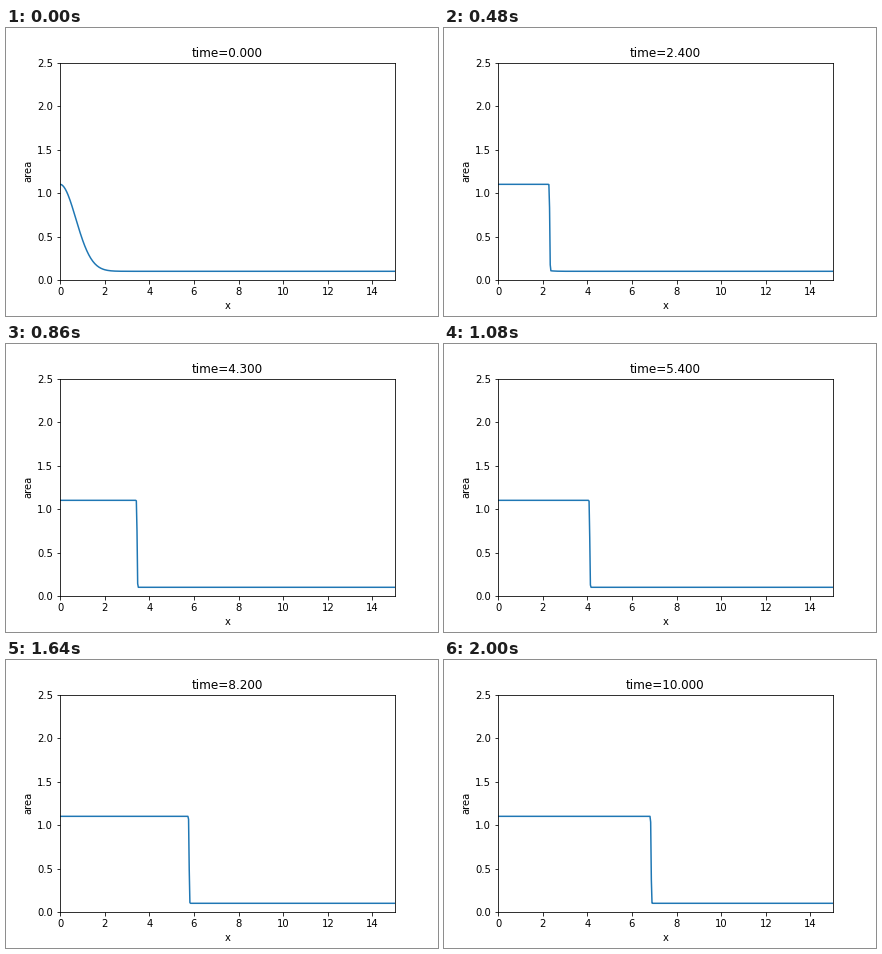
Animation of 432x288 px, one loop 2.02 s. Source, as a matplotlib script:

```python
import numpy as np
import matplotlib.pyplot as plt
from matplotlib.animation import FuncAnimation

LENGTH, CELLS = 15.0, 501
FRAMES, STEP = 101, 0.1
SUBSTEPS = 5
K, M = 0.472, 2.5


def flux(a):
    return K * a**M


def solve(x):
    """Upwind solution of a_t + flux(a)_x = 0, one row per output time."""
    a = 0.1 + np.exp(-x**2)
    ratio = STEP / SUBSTEPS / (x[1] - x[0])
    rows = [a.copy()]
    for _ in range(FRAMES - 1):
        for _ in range(SUBSTEPS):
            a[1:] -= ratio * np.diff(flux(a))
        rows.append(a.copy())
    return rows


x = np.linspace(0, LENGTH, CELLS)
areas = solve(x)

fig, ax = plt.subplots(figsize=(6, 4), dpi=72)
fig.subplots_adjust(left=0.125, right=0.9, bottom=0.125, top=0.88)
line, = ax.plot(x, areas[0], color="#1f77b4", lw=1.5)
ax.set(xlim=(0, LENGTH), ylim=(0, 2.5), xlabel="x", ylabel="area")
title = ax.set_title("time=0.000")


def update(i):
    line.set_ydata(areas[i])
    title.set_text(f"time={i * STEP:.3f}")
    return line, title


anim = FuncAnimation(fig, update, frames=FRAMES, interval=20, repeat=True,
                     repeat_delay=0, blit=False)
plt.show()
```
